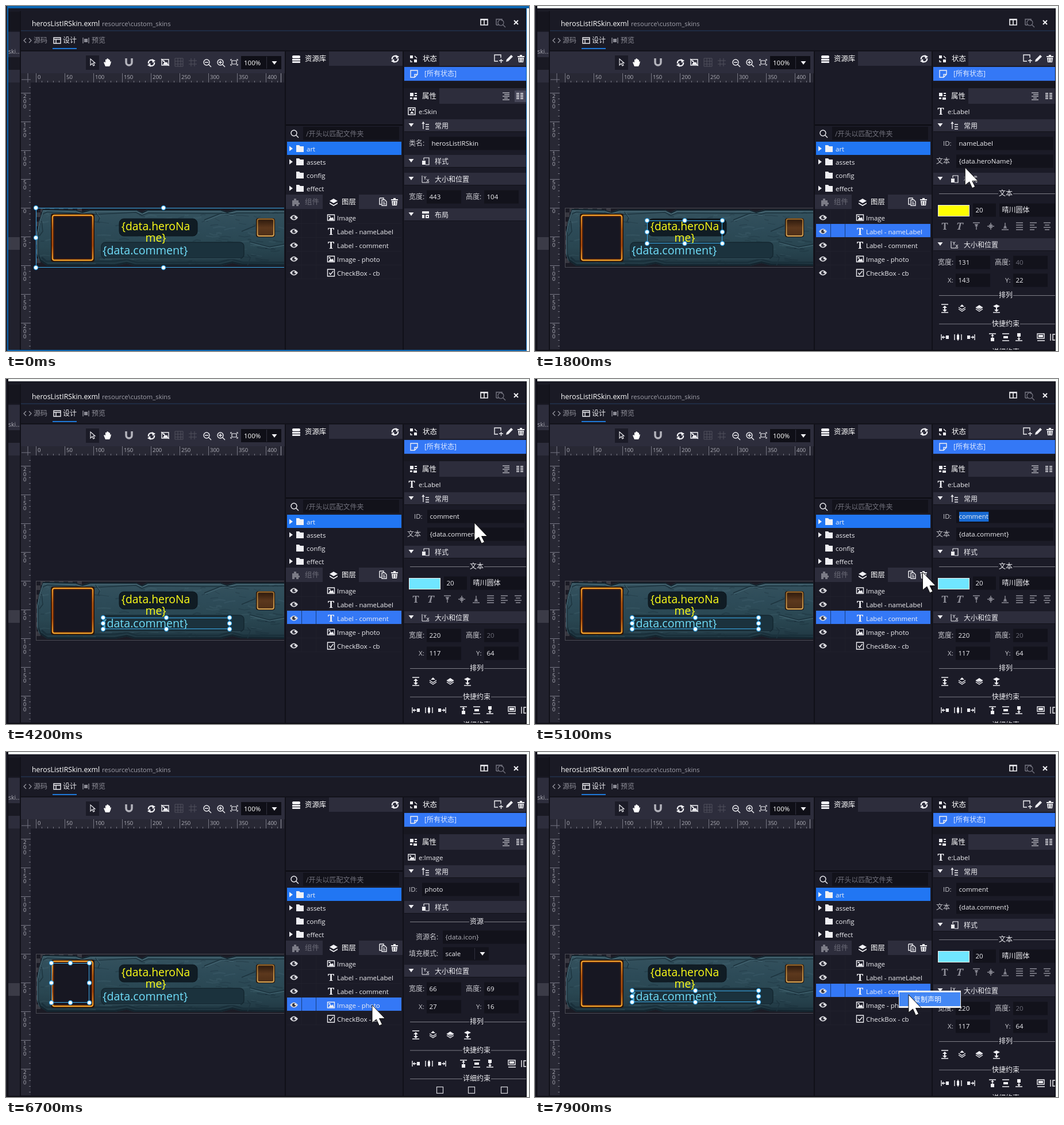
An HTML page with a canvas that plays this animation: 910x600 px, repeating every 8 s.

```html
<!DOCTYPE html>
<html lang="zh">
<head>
<meta charset="utf-8">
<style>
html, body { margin: 0; width: 910px; height: 600px; overflow: hidden; background: #1a1a26; }
canvas { display: block; }
</style>
</head>
<body>
<canvas id="stage" width="910" height="600"></canvas>
<script>
const g = document.getElementById('stage').getContext('2d');
const BG = '#1b1b27', BAR = '#2d2d3c', DEEP = '#12121b', BLUE = '#3478f6', INK = '#f0f0f4', DIM = '#6c6c78';
const LOOP = 8000, STEP = 100;

// Basic helpers
function rect(x, y, w, h, c) { g.fillStyle = c; g.fillRect(x, y, w, h); }
function frame(x, y, w, h, c, lw = 1) { g.strokeStyle = c; g.lineWidth = lw; g.strokeRect(x + .5, y + .5, w - 1, h - 1); }
function round(x, y, w, h, r, fill, stroke, lw = 1) {
  g.beginPath(); g.roundRect(x, y, w, h, r);
  if (fill) { g.fillStyle = fill; g.fill(); }
  if (stroke) { g.strokeStyle = stroke; g.lineWidth = lw; g.stroke(); }
}
function text(s, x, y, c = INK, size, align = 'left', weight = 400) {
  size = size || (/[\u4e00-\u9fff]/.test(s) ? 12 : 11.5);
  g.font = `${weight} ${size}px "Open Sans", "Noto Sans CJK SC", "Noto Sans CJK", sans-serif`;
  g.textAlign = align; g.fillStyle = c;
  g.fillText(s, x, y + size * .36);
}
function line(d, x = 0, y = 0, c = INK, lw = 1.4) {
  g.save(); g.translate(x, y); g.strokeStyle = c; g.lineWidth = lw; g.stroke(new Path2D(d)); g.restore();
}
function fill(d, x = 0, y = 0, c = INK) {
  g.save(); g.translate(x, y); g.fillStyle = c; g.fill(new Path2D(d)); g.restore();
}
function vgrad(y0, y1, ...cs) {
  const k = g.createLinearGradient(0, y0, 0, y1);
  cs.forEach((c, i) => k.addColorStop(i / (cs.length - 1), c));
  return k;
}
function field(x, y, w, s, c, h = 23) { rect(x, y - h / 2, w, h, DEEP); text(s, x + 4.5, y, c); }

// Icons, drawn around their own centre
const down = 'M-4.5-3h9L0 3z', right = 'M-2-4.5v9L4 0z';
const glass = 'M4-1A5 5 0 1 1-6-1A5 5 0 1 1 4-1M3 3L7 7';
const icon = {
  picture(x, y, c = INK) { line('M-6-5h12v10h-12z', x, y, c); fill('M-4 4L-1-1L1 1L3-1L5 4zM-4-3h3v2h-3z', x, y, c); },
  letter(x, y, c = INK) {
    g.font = 'bold 17px "Noto Serif", serif'; g.textAlign = 'center'; g.fillStyle = c; g.fillText('T', x, y + 5.5);
  },
  check(x, y) { line('M-6-6h12v12h-12zM-3 0L-1 3L4-3', x, y); },
  skin(x, y) { line('M-6-6h12v12h-12z', x, y); fill('M-4-4h3v3h-3zM-3 4L0 0L4 4zM1-4h3v3h-3z', x, y); },
  eye(x, y) {
    fill('M-7 0Q0-9 7 0Q0 9-7 0', x, y, '#d8d8dd'); fill('M3 0A3 3 0 1 1-3 0A3 3 0 1 1 3 0', x, y, '#33333f');
    fill('M1-2h2v2h-2z', x, y, '#fff');
  },
  refresh(x, y) {
    line('M-5 1A5 5 0 0 1 3-4M5-1A5 5 0 0 1-3 4', x, y, INK, 2.2);
    fill('M1-7L7-4L2 0zM-1 7L-7 4L-2 0z', x, y);
  },
  trash(x, y) { line('M-6-4h12M-2-6h4', x, y, INK, 2); fill('M-5-2h10l-1 8h-8z', x, y); line('M-2-1v6M2-1v6', x, y, BG, 1); },
  layers(x, y) { fill('M0-6L7-2L0 2L-7-2zM-7 1L0 5L7 1L7 3L0 7L-7 3z', x, y); },
  folder(x, y) { fill('M-6-6h5l2 2h6v10h-13z', x, y); },
  lines(x, y, c = INK) { line('M-6-6h12M-3-3h9M-6 0h12M-3 3h6M-6 6h12', x, y, c, 1.2); },
  table(x, y) { line('M-6-5h5M1-5h5M-6-2h5M1-2h5M-6 1h5M1 1h5M-6 4h5M1 4h5', x, y, INK, 1.6); },
  blocks(x, y) { fill('M-6-6h6v6h-6zM2-6h4v2h-4zM2-2h4v2h-4zM-6 2h4v3h-4zM0 2h6v4h-6z', x, y); },
  style(x, y) { line('M-3-6h9v12h-6M-3-6v4', x, y, INK, 1.2); fill('M-6-1h6v7h-6z', x, y); },
  size(x, y) { line('M-6-6v12M-3-5l2 3l2-3M-1-2v3M-6 6h12M2 0l4 5M6 0l-4 5', x, y, INK, 1); },
  common(x, y) { line('M-4 6v-11M-6-3l2-3l2 3M0-2h6M0 2h6M0 6h6', x, y, INK, 1.3); },
  layout(x, y) { fill('M-6-6h12v4h-12zM-6 0h4v6h-4zM0 0h6v6h-6z', x, y); rect(x + 2, y + 2, 2, 2, BAR); }
};

// Pointer track: time, x, y
const track = [
  [400, 881, 76], [1100, 653, 388], [1500, 653, 388], [1900, 780, 245], [2000, 780, 245], [2200, 799, 226],
  [2500, 721, 235], [3000, 721, 235], [3100, 717, 291], [3400, 642, 417], [3700, 642, 417], [4200, 815, 250],
  [4300, 826, 238], [4500, 738, 230], [4700, 711, 228], [4900, 711, 228], [5300, 638, 444], [5400, 638, 444],
  [5500, 633, 447], [6300, 633, 447], [6700, 637, 440], [7000, 633, 417], [7600, 633, 417], [7900, 650, 422]
];
function pointer(t) {
  const i = track.findIndex(k => k[0] >= t);
  if (i < 0) return track.at(-1).slice(1);
  if (!i) return track[0].slice(1);
  const [a, x, y] = track[i - 1], [b, u, v] = track[i], p = (t - a) / (b - a);
  return [x + (u - x) * p, y + (v - y) * p];
}

function windowFrame(active) {
  rect(0, 0, 910, 600, '#1a1a25');
  rect(4, 10, 20, 33, '#15151e');
  rect(4, 45, 20, 44, BAR); rect(4, 89, 20, 22, '#191923');
  rect(4, 111, 20, 22, BAR); rect(4, 133, 20, 465, '#21212d');
  rect(4, 402, 20, 22, '#3b3b47');
  text('ski...', 4, 79, '#a8a8b0', 10.5);
  rect(24, 9, 2, 589, '#111119');
  rect(26, 42, 880, 2, '#202b42'); rect(26, 77, 880, 2, '#12121a');
  text('herosListIRSkin.exml', 45, 31, '#fff', 12.3);
  text('resource\\custom_skins', 167, 31, '#a2a2ac', 11.2);
  line('M-6-5h12v10h-12zM0-5v10M-6-4h12', 832, 28, INK, 1.6);
  line('M-6 5V-5H4V-2M-6 5h4', 859, 28, '#777783'); line(glass, 862, 30, '#777783', 1.2);
  line('M-3-3L4 4M4-3L-3 4', 887, 28, INK, 2);
  line('M-2-4L-6 0L-2 4M3-4L7 0L3 4', 37, 60, '#9a9aa4', 1.2);
  text('源码', 48, 60, '#8b8b95');
  line('M-6-5h12v10h-12zM-6-2h12M-2-2v7', 89, 60);
  text('设计', 99, 60);
  rect(81, 73, 42, 2, '#1f79d8');
  line('M-5-5v10M5-5v10', 139, 60, '#8b8b95'); rect(136, 57, 6, 6, '#8b8b95');
  text('预览', 149, 60, '#8b8b95');
  const edge = active ? '#0a66b2' : '#0e0e15';
  rect(0, 0, 4, 600, '#20202b');
  rect(2, 0, 2, 600, edge); rect(2, 598, 904, 2, edge);
  rect(905, 4, 1, 596, edge); rect(906, 0, 4, 600, '#f7fcfa');
  rect(4, 0, 906, 4, active ? '#0a66b2' : '#f7fcfa');
}

function toolbar() {
  rect(26, 79, 459, 38, BAR);
  rect(139, 86, 23, 25, BG);
  line('M-3-6V5L0 2L2 6L4 5L2 1H5z', 150, 98, INK, 1.1);
  fill('M-4 7L-7 0L-5-1L-4 1V-5L-2-5L-1-7L1-6L2-5L4-4V-1L6-2L5 3L3 7z', 177, 98, '#fff');
  line('M-5-7V0A5 5 0 0 0 5 0V-7', 214, 98, '#b4b4bc', 3.5);
  icon.refresh(253, 99);
  icon.picture(277, 98); line('M-7-6L7 6', 277, 98, INK, 1.2);
  line('M-7-7h14v14h-14zM-7-2h14M-7 3h14M-2-7v14M3-7v14', 301, 98, '#51515d', 1);
  line('M-7-3h14M-7 3h14M-3-7v14M3-7v14', 325, 98, '#51515d', 1);
  line(glass + 'M-4-1h6', 350, 99); line(glass + 'M-4-1h6M-1-4v6', 374, 99);
  line('M-4-3h8v6h-8zM-6-3v-2h2M6-3v-2h-2M-6 3v2h2M6 3v2h-2', 397, 98, INK, 1.2);
  rect(409, 87, 70, 23, '#0f0f17');
  text('100%', 414, 99, '#fff', 11.5);
  rect(453, 88, 1, 21, '#30303c'); fill(down, 467, 99);
}

function rulers() {
  rect(26, 117, 458, 16, '#282834'); rect(26, 117, 17, 480, '#282834');
  line('M27 128H43M38 117V133', 0, 0, '#777784', 1);
  for (let v = 0; v < 43; v++) {
    const big = v % 5 == 0, x = 52 + v * 10;
    rect(x, big ? 117 : 130, 1, big ? 16 : 3, '#777784');
    if (big) text(String(v * 10), x + 3, 124, '#b2b2bb', 9.5);
  }
  rect(478, 117, 1, 16, '#9a9aa4');
  for (let v = -21; v < 25; v++) {
    const big = v % 5 == 0, y = 351 + v * 10;
    rect(big ? 26 : 40, y, big ? 17 : 3, 1, '#777784');
    if (big) [...String(Math.abs(v) * 10)].forEach((d, i) => text(d, 30, y + 6 + i * 9, '#b2b2bb', 9.5));
  }
}

function banner() {
  g.save();
  g.beginPath(); g.rect(52, 351, 432, 104); g.clip();
  rect(52, 351, 432, 104, '#1b1b25');
  for (let i = 0; i < 120; i++) if (i % 2 ^ (i / 10 & 1)) rect(52 + i % 10 * 8, 351 + (i / 10 | 0) * 8, 8, 8, '#393942');
  const stone = 'M64 353L120 354L132 358L146 354H226L236 359L246 354H372L384 358L400 354H490V452L410 451L394 447L374 452H224L210 448L190 452H72L58 443L54 432V392L58 372z';
  fill(stone, 0, 0, vgrad(353, 453, '#35525e', '#2d4b58', '#294651', '#203742'));
  g.clip(new Path2D(stone));
  let seed = 7;
  const rnd = () => (seed = seed * 16807 % 2147483647) / 2147483647;
  for (let i = 0; i < 150; i++) {
    const x = 54 + rnd() * 430, y = 354 + rnd() * 98, r = 3 + rnd() * 9;
    line(`M${x} ${y}l${r} ${rnd() * 6 - 3}l${r} ${rnd() * 4 - 2}`, 0, 0, i % 2 ? 'rgba(90,130,145,.14)' : 'rgba(8,22,30,.17)', 1 + rnd() * 2);
  }
  line(stone, 0, 0, '#14252f', 6); line(stone, 1, 3, '#4a6b78', 1.5);
  line('M64 362L72 358L128 361L140 363L226 359L236 364L248 360L374 361L386 364L402 360H484', 0, 0, '#1d343f', 1.5);
  line('M62 437L70 444H190L210 441L228 446H370L392 440L412 446H484', 0, 0, '#1a303b', 3);
  line('M58 400l6-8l-2-18M156 358l7 10l-3 8M420 452l5-14l-5-6M345 372l30-12l20 2M410 392l24-10M424 410l34 9l26-5', 0, 0, '#1d343f', 1.5);
  line('M157 358l7 10M346 374l30-12l20 2M425 412l34 9l26-5', 0, 0, '#486a77', 1);
  g.restore();
  line('M52 351.5H484M52.5 351V455M52 454.5H484', 0, 0, '#4b4b54', 1);

  round(78, 361, 76, 84, 4, '#2a1409');
  round(81, 364, 70, 78, 3, null, vgrad(363, 443, '#f6a32c', '#b85a0e', '#b04c0a', '#f4a62c'), 2.5);
  round(83, 366, 66, 74, 2, '#171722', '#50200c', 1.5);
  round(197, 370, 136, 30, 8, '#101c24', '#0b151c', 1);
  round(166, 411, 248, 28, 7, '#1b323d', '#142731', 1.5);
  line('M172 439.5H408', 0, 0, '#35535f', 1);
  round(435, 369, 33, 33, 4, '#26150b');
  round(437.5, 370.5, 28.5, 29.5, 3, vgrad(371, 400, '#2e1a0d', '#5c381d', '#4f2f17'), vgrad(369, 402, '#a06d2c', '#dcab59'), 1.8);
  text('{data.heroNa', 260.5, 383.5, '#ffff18', 19.3, 'center', 500);
  text('me}', 260.5, 403, '#ffff18', 19.3, 'center', 500);
  text('{data.comment}', 168, 425, '#70defa', 19.6, 'left', 500);
}

const bounds = {
  skin: [52, 351, 444, 104], name: [195, 373, 131, 40], comment: [169, 415, 220, 20], photo: [79, 367, 66, 69]
};
function selection(sel) {
  const [x, y, w, h] = bounds[sel];
  g.save();
  g.beginPath(); g.rect(44, 133, 440, 464); g.clip();
  frame(x, y, w, h, '#3aabea');
  for (let i = 0; i < 9; i++) {
    if (i == 4) continue;
    g.beginPath();
    g.arc(x + i % 3 * w / 2, y + (i / 3 | 0) * h / 2, 3.6, 0, 7);
    g.fillStyle = '#fff'; g.fill();
    g.strokeStyle = '#2a9fe6'; g.lineWidth = 1.2; g.stroke();
  }
  g.restore();
}

const rows = [['picture', 'Image'], ['letter', 'Label - nameLabel', 'name'], ['letter', 'Label - comment', 'comment'],
  ['picture', 'Image - photo', 'photo'], ['check', 'CheckBox - cb']];
function library(sel, [mx, my]) {
  rect(485, 79, 2, 519, '#101018'); rect(487, 79, 203, 518, BG);
  rect(487, 79, 203, 25, BAR); rect(487, 79, 75, 25, BG);
  round(498, 86, 14, 5, 2, INK); rect(498, 92, 14, 3, INK); round(498, 96, 14, 3, 1, INK);
  text('资源库', 520, 92, '#fff', 12.4, 'left', 500);
  icon.refresh(677, 92);
  rect(487, 206, 203, 2, '#0b0b11');
  line(glass, 502, 222);
  rect(517, 210, 167, 23, '#12121a');
  text('/开头以匹配文件夹', 522, 223, '#72727d');
  rect(489, 236, 199, 23, '#2176f3');
  ['art', 'assets', 'config', 'effect'].forEach((s, i) => {
    const y = 248 + i * 23;
    if (i != 2) fill(right, 495, y);
    icon.folder(511, y); text(s, 523, y + 1);
  });
  rect(487, 328, 203, 25, BAR); rect(551, 328, 63, 25, BG);
  fill('M-6-3h3v-3h4v3h4v4h2v3h-2v3h-4v-3h-3v3h-4z', 504, 341, '#7b7b86');
  text('组件', 520, 341, DIM, 12.4);
  icon.layers(570, 341); text('图层', 584, 341, '#fff', 12.4, 'left', 500);
  line('M-6-6h7v3M-6-6v11h3M-2-3h5l3 3v7h-8zM0 1h3M0 4h4', 656, 340);
  icon.trash(676, 341);
  rows.forEach(([kind, label, id], i) => {
    const y = 368 + i * 24, top = y - 13, on = id == sel;
    const over = mx > 489 && mx < 688 && my > top && my < top + 24;
    if (on || over) rect(489, top, 199, 23, on ? BLUE : '#232331');
    rect(489, top + 23, 199, 1, '#20202c');
    for (const x of [514, 539]) rect(x, top, 1, 23, on ? '#173c7c' : '#1f1f2a');
    icon.eye(501, y); icon[kind](565.5, y); text(label, 576, y + 1);
  });
}

function section(y, name, kind) {
  rect(693, y - 11, 212, 22, BAR); rect(693, y + 10, 212, 1, '#111119');
  fill(down, 705, y - 1); icon[kind](730, y); text(name, 746, y + 1);
}
function caption(y, s) {
  const half = s.length * 6 + 1;
  rect(703, y, 819 - half - 703, 1, '#7d7d86'); rect(819 + half, y, 905 - 819 - half, 1, '#7d7d86');
  text(s, 819, y, INK, 12, 'center');
}
function sizes(y, w, h, hc) {
  section(y, '大小和位置', 'size');
  text('宽度:', 701, y + 31, '#c8c8ce'); field(732, y + 31, 60, w);
  text('高度:', 800, y + 31, '#c8c8ce'); field(832, y + 31, 60, h, hc);
}
function placement(y, x, v) {
  text('X:', 718, y + 62, '#c8c8ce'); field(732, y + 62, 60, x);
  text('Y:', 818, y + 62, '#c8c8ce'); field(832, y + 62, 60, v);
  caption(y + 88, '排列');
  line('M-6-7h12M-6 7h12', 713, y + 111); fill('M0-5L4-1H1V2H4L0 6L-4 2H-1V-1H-4z', 713, y + 111);
  for (const x of [743, 773]) {
    line('M-6 1L0 5L6 1M-6-2L0 2L6-2', x, y + 111);
    fill(x < 750 ? 'M0-7L4-3H-4z' : 'M0-6L6-2L0 0L-6-2z', x, y + 111);
  }
  line('M-6 7h12', 803, y + 111); fill('M0-7L6-4L0-1L-6-4zM-1-2h2v4h3L0 6L-4 2h3z', 803, y + 111);
  caption(y + 137.5, '快捷约束');
  line('M-6-5v10M-5 0h6', 713, y + 161); fill('M2-3h5v6h-5zM-5 0l3-3v6z', 713, y + 161);
  line('M-6-5v10M6-5v10M0-6v12', 736, y + 161); fill('M-2-4h4v8h-4z', 736, y + 161);
  line('M6-5v10M-1 0h6', 759, y + 161); fill('M-7-3h5v6h-5zM5 0l-3-3v6z', 759, y + 161);
  line('M-6-6h12M0-5v6', 796, y + 161); fill('M-3 1h6v6h-6zM0-5l3 3h-6z', 796, y + 161);
  line('M-6-6h12M-6 6h12', 819, y + 161); fill('M-4-2h8v4h-8z', 819, y + 161);
  line('M-6 6h12M0-1v6', 842, y + 161); fill('M-3-7h6v6h-6zM0 5l3-3h-6z', 842, y + 161);
  line('M-6-6h12v8h-12zM-6 6h13', 880, y + 161); fill('M-4-4h8v4h-8z', 880, y + 161);
  line('M-4-6v12M0-5h8v10h-8z', 901, y + 161);
  caption(y + 187, '详细约束');
  for (const x of [755, 810, 867]) frame(x - 6, y + 201, 12, 12, '#d8d8dd', 1.2);
}
function idField(x, s, marked, mx) {
  rect(x, 227.5, 169, 23, DEEP);
  if (marked) {
    g.font = '11.5px "Open Sans", sans-serif';
    const left = Math.max(x + 5, mx), end = x + 5 + g.measureText(s).width;
    if (end > left) rect(left, 231, end - left, 17, '#1769d2');
  }
  text(s, x + 4.5, 239);
}

const panels = {
  skin() {
    icon.skin(706, 183); text('e:Skin', 718, 184);
    section(208, '常用', 'common');
    text('类名:', 701, 239, '#c8c8ce'); field(736, 239, 169, 'herosListIRSkin');
    section(270, '样式', 'style');
    sizes(301, '443', '104');
    section(363, '布局', 'layout');
  },
  label(id, content, color, w, h, x, y, marked, mx) {
    icon.letter(706, 183); text('e:Label', 718, 184);
    section(208, '常用', 'common');
    text('ID:', 710, 239, '#c8c8ce'); idField(733, id, marked, mx);
    text('文本', 698, 270, '#c8c8ce'); field(733, 270, 169, content);
    section(301, '样式', 'style');
    caption(326, '文本');
    rect(701, 346, 55, 20, '#f0f0f0'); rect(702, 347, 53, 18, color);
    field(762, 355, 40, '20'); field(808, 355, 97, '晴川圆体');
    const c = '#8f8f99';
    icon.letter(713, 383, c);
    g.save(); g.translate(739, 383); g.transform(1, 0, -.25, 1, 0, 0); icon.letter(0, 0, c); g.restore();
    line('M-6-6h12M-3-3h6M0-2v8M-2 0l2-2l2 2', 768, 383, c);
    line('M-6 0h12M0-6v12M-3-2h6M-3 2h6', 793, 383, c);
    line('M-6 6h12M-3 3h6M0 2v-8M-2 0l2 2l2-2', 818, 383, c);
    line('M-6-6h12M-6-2h12M-6 2h12M-6 6h12', 843, 383, c);
    line('M-6-6h12M-6-2h8M-6 2h12M-6 6h8', 867, 383, c);
    line('M-6-6h12M-4-2h8M-6 2h12M-4 6h8', 891, 383, c);
    sizes(415, w, h, DIM); placement(415, x, y);
  },
  image() {
    icon.picture(706, 183); text('e:Image', 718, 184);
    section(208, '常用', 'common');
    text('ID:', 701, 239, '#c8c8ce'); idField(724, 'photo');
    section(270, '样式', 'style');
    caption(295, '资源');
    text('资源名:', 713, 322, '#c8c8ce'); field(760, 322, 145, '{data.icon}', '#b5b5bd');
    text('填充模式:', 701, 351, '#c8c8ce'); field(760, 351, 80, 'scale');
    rect(815, 341, 1, 20, '#30303c'); fill(down, 829, 351);
    sizes(381, '66', '69'); placement(381, '27', '16');
  }
};

function properties(panel, marked, mx, lit) {
  g.save();
  g.beginPath(); g.rect(690, 79, 215, 519); g.clip();
  rect(690, 79, 215, 519, BG); rect(690, 79, 2, 519, '#101018');
  rect(692, 79, 213, 25, BAR); rect(692, 79, 62, 25, BG);
  fill('M-6-6h5v5h-5zM1 1h5v5h-5z', 709, 92); line('M-5 2v3h3M2-5l4 4', 709, 92);
  text('状态', 725, 92, '#fff', 12.4, 'left', 500);
  line('M5-1V-6H-6V5H0M2 4h7M5.500 1v7', 856, 91);
  fill('M-6 6L-5 2L3-6L6-3L-2 5z', 876, 91); icon.trash(896, 92);
  rect(693, 106, 212, 24, BLUE);
  line('M-6-6h12v7l-5 5h-7zM6 1h-5v5', 710, 118); text('[所有状态]', 728, 118, '#dbe7ff');
  rect(692, 132, 213, 11, '#171720');
  rect(692, 143, 213, 27, BAR); rect(692, 143, 62, 27, BG);
  if (lit) rect(885, 147, 20, 20, '#48485a');
  icon.blocks(709, 157); text('属性', 724, 157, '#fff', 12.4, 'left', 500);
  icon.lines(870, 157); icon.table(894, 157);
  if (panel == 'name') panels.label('nameLabel', '{data.heroName}', '#ff0', '131', '40', '143', '22', marked, mx);
  else if (panel == 'comment') panels.label('comment', '{data.comment}', '#70e6ff', '220', '20', '117', '64', marked, mx);
  else if (panel == 'photo') panels.image();
  else panels.skin();
  g.restore();
}

function arrow(x, y) {
  const d = 'M0 0V31L7.500 25L12.500 36L17.500 33.500L12.500 23.500H22.500z';
  fill(d, x, y, '#fff'); line(d, x, y, '#111', 1);
}

function stateAt(t, ...changes) { return changes.reduce((s, [at, v]) => t >= at ? v : s, 'skin'); }

function draw(t) {
  const sel = stateAt(t, [1300, 'name'], [3700, 'comment'], [5700, 'photo'], [7100, 'comment']);
  const panel = stateAt(t, [1400, 'name'], [3800, 'comment'], [5900, 'photo'], [7200, 'comment']);
  const marked = t >= 2300 && t < 3700 || t >= 4400 && t < 5700;
  const pos = t < 400 ? [-99, -99] : pointer(t);
  const mx = t >= 2500 && t < 4000 || t >= 4700 ? 0 : pos[0];
  windowFrame(t < 1300);
  toolbar(); rect(43, 133, 441, 464, BG); rulers();
  banner(); selection(sel);
  library(sel, pos);
  properties(panel, marked, mx, t < 500);
  if (t >= 7700) {
    rect(633, 415, 108, 30, '#f2f2f2'); rect(634, 418, 106, 24, '#4387f4');
    text('复制声明', 659, 431, '#fff');
  }
  arrow(...pos);
}

let last = -1;
function tick() {
  const t = Math.floor(performance.now() % LOOP / STEP) * STEP;
  if (t != last) draw(last = t);
  requestAnimationFrame(tick);
}
tick();
</script>
</body>
</html>
```
